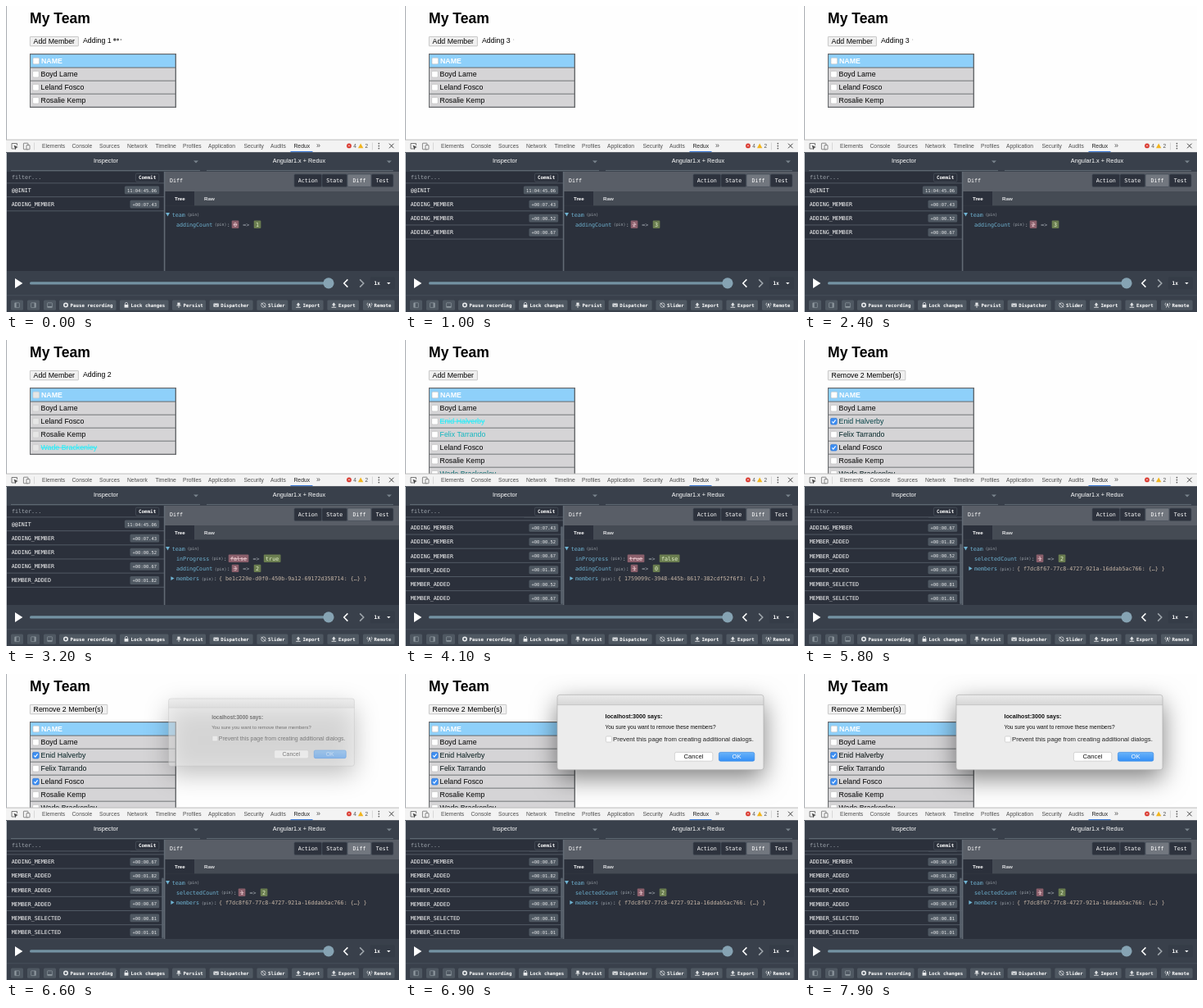
Animation, 480 px wide and 373 px high, one loop 8 s. Source, as an HTML page with a canvas:

```html
<!DOCTYPE html>
<html lang="en">
<head>
<meta charset="utf-8">
<title>My Team</title>
<style>
html, body { margin: 0; width: 100%; height: 100%; overflow: hidden; background: #fff; }
canvas { display: block; width: 480px; height: 373px; }
</style>
</head>
<body>
<canvas id="stage"></canvas>
<script>
const W = 480, H = 373, LOOP = 8000;
const SANS = '"Liberation Sans", Arial, sans-serif';
const MONO = '"DejaVu Sans Mono", Menlo, monospace';
const C = { bg: '#2b303b', bar: '#39404b', mid: '#4f5862', line: '#515964',
  text: '#fff', key: '#6fb3d2', soft: '#a3aab1' };

const canvas = document.getElementById('stage');
const ctx = canvas.getContext('2d');
const dpr = window.devicePixelRatio || 1;
canvas.width = W * dpr;
canvas.height = H * dpr;

const EVENTS = [
  { at: -400, name: '@@INIT', time: '11:04:45.06', diff: [] },
  { at: -300, name: 'ADDING_MEMBER', time: '+00:07.43', diff: [['addingCount', '0', '1']] },
  { at: 300, name: 'ADDING_MEMBER', time: '+00:00.52', diff: [['addingCount', '1', '2']] },
  { at: 900, name: 'ADDING_MEMBER', time: '+00:00.67', diff: [['addingCount', '2', '3']] },
  { at: 2700, name: 'MEMBER_ADDED', time: '+00:01.82', id: 'be1c220e-d0f0-450b-9a12-69172d358714',
    diff: [['inProgress', 'false', 'true'], ['addingCount', '3', '2']] },
  { at: 3300, name: 'MEMBER_ADDED', time: '+00:00.52', id: '4c07d1b2-62ae-4f19-b3d5-80e49a7c15f6',
    diff: [['addingCount', '2', '1']] },
  { at: 3900, name: 'MEMBER_ADDED', time: '+00:00.67', id: '1759099c-3948-445b-8617-382cdf52f6f3',
    diff: [['inProgress', 'true', 'false'], ['addingCount', '1', '0']] },
  { at: 4700, name: 'MEMBER_SELECTED', time: '+00:00.81', id: '1759099c-3948-445b-8617-382cdf52f6f3',
    diff: [['selectedCount', '0', '1']] },
  { at: 5700, name: 'MEMBER_SELECTED', time: '+00:01.01', id: 'f7dc8f67-77c8-4727-921a-16ddab5ac766',
    diff: [['selectedCount', '1', '2']] }
];

const MEMBERS = [
  { name: 'Boyd Larne' },
  { name: 'Enid Halverby', added: 3900, picked: 4700 },
  { name: 'Felix Tarrando', added: 3300 },
  { name: 'Leland Fosco', picked: 5700 },
  { name: 'Rosalie Kemp' },
  { name: 'Wade Brackenley', added: 2700 }
];

const DIALOG_AT = 6600;

function rect(x, y, w, h, color) {
  ctx.fillStyle = color;
  ctx.fillRect(x, y, w, h);
}

function box(x, y, w, h, r, fill, stroke) {
  ctx.beginPath();
  ctx.roundRect(x, y, w, h, r);
  if (fill) { ctx.fillStyle = fill; ctx.fill(); }
  if (stroke) { ctx.strokeStyle = stroke; ctx.lineWidth = 0.7; ctx.stroke(); }
}

function label(str, x, y, size, color, opt = {}) {
  ctx.font = `${opt.bold ? 'bold ' : ''}${size}px ${opt.mono ? MONO : SANS}`;
  ctx.textAlign = opt.align || 'left';
  ctx.fillStyle = color;
  ctx.fillText(str, x, y);
}

const mono = (str, x, y, color, size = 6.68, bold = false) =>
  label(str, x, y, size, color, { mono: true, bold });

function poly(points, color) {
  ctx.beginPath();
  points.forEach(([x, y]) => ctx.lineTo(x, y));
  ctx.closePath();
  ctx.fillStyle = color;
  ctx.fill();
}

function path(points, color, width) {
  ctx.beginPath();
  points.forEach(([x, y]) => ctx.lineTo(x, y));
  ctx.strokeStyle = color;
  ctx.lineWidth = width;
  ctx.stroke();
}

function dot(x, y, r, color) {
  ctx.beginPath();
  ctx.arc(x, y, r, 0, Math.PI * 2);
  ctx.fillStyle = color;
  ctx.fill();
}

const down = (x, y, r, color) => poly([[x - r, y - r / 2], [x + r, y - r / 2], [x, y + r / 2]], color);

function clip(x, y, w, h, draw) {
  ctx.save();
  ctx.beginPath();
  ctx.rect(x, y, w, h);
  ctx.clip();
  draw();
  ctx.restore();
}

function checkbox(x, y, checked, disabled) {
  const fill = checked ? '#3b8df2' : disabled ? '#e6e6e6' : '#fff';
  box(x, y, 7.6, 7.6, 1.4, fill, checked ? '#2f78d6' : disabled ? '#cfcfcf' : '#c4c4c4');
  if (checked) path([[x + 1.7, y + 4], [x + 3.2, y + 5.7], [x + 6, y + 1.9]], '#fff', 1.1);
}

function button(str, w) {
  box(29.4, 37.4, w, 11.4, 0.5, '#f0f0f0', '#b4b4b4');
  label(str, 33.6, 46, 8.8, '#000');
}

// Three dots that swell one after another.
function spinner(t) {
  for (let i = 0; i < 3; i++) {
    const p = ((t + 480 - i * 160) % 1400 + 1400) % 1400 / 1120;
    const s = p < 1 ? (1 - Math.cos(p * 2 * Math.PI)) / 2 : 0;
    if (s > 0.02) dot(132.8 + i * 3.8, 41, 1.8 * Math.sqrt(s), '#555');
  }
}

function page(t) {
  rect(0, 0, W, 163, '#fefefe');
  rect(0, 0, 1, 163, '#a9adb2');
  label('My Team', 29, 21, 17.6, '#000', { bold: true });

  const picked = MEMBERS.filter(m => m.picked <= t).length;
  if (picked) button(`Remove ${picked} Member(s)`, 94.4);
  else button('Add Member', 59);

  const started = EVENTS.filter(e => e.at <= t && e.name === 'ADDING_MEMBER').length;
  const arrived = MEMBERS.filter(m => m.added <= t).length;
  const busy = arrived > 0 && started > arrived;
  if (started > arrived) {
    label(`Adding ${started - arrived}`, 94, 44.8, 8.8, '#000');
    if (!busy) spinner(t);
  }

  const rows = MEMBERS.filter(m => !(m.added > t));
  rect(29, 58, 179, 18 + rows.length * 16, '#66686b');
  rect(30, 59.2, 176.6, 15.4, '#8ed0fa');
  checkbox(33, 63.2, false, busy);
  label('NAME', 43, 69.8, 8.8, '#fff', { bold: true });
  rows.forEach((m, i) => {
    const y = 75.6 + i * 16;
    rect(30, y, 176.6, 15.1, '#d5d4d6');
    checkbox(32.6, y + 3.8, m.picked <= t, busy);
    const age = m.added === undefined ? Infinity : t - m.added;
    const k = Math.exp(-Math.max(0, age - 500) / 1100);
    const color = `rgb(${Math.round(25 * k)},${Math.round(240 * k)},${Math.round(252 * k)})`;
    label(m.name, 42.6, y + 10.5, 8.8, color);
    if (age < 550) rect(42.6, y + 7.2, ctx.measureText(m.name).width, 0.7, color);
  });
}

function tabs() {
  rect(0, 163, W, 16, '#f3f3f3');
  rect(0, 162.6, W, 0.9, '#b5b5b5');
  path([[11, 174], [7, 174], [7, 167.5], [13.5, 167.5], [13.5, 170]], '#5a5a5a', 0.8);
  poly([[9.6, 169.8], [14.8, 172], [12.6, 172.8], [11.6, 175.4]], '#444');
  box(21.4, 167.2, 5.6, 7.6, 0.6, null, '#5a5a5a');
  box(25, 169.6, 4, 5.2, 0.4, '#f3f3f3', '#5a5a5a');
  rect(34, 166.5, 0.7, 9, '#ccc');
  const names = 'Elements Console Sources Network Timeline Profiles Application Security Audits Redux'.split(' ');
  const xs = [44, 80.5, 114, 148, 182.5, 216, 247, 290.5, 323, 351.5];
  names.forEach((n, i) => label(n, xs[i], 172.8, 6.75, i === 9 ? '#222' : '#505050'));
  rect(347.5, 177, 27, 1.2, '#3b79d8');
  label('»', 379, 173, 9, '#555');
  dot(419, 170.4, 2.9, '#d9352b');
  path([[418, 169.4], [420, 171.4]], '#fff', 0.7);
  path([[420, 169.4], [418, 171.4]], '#fff', 0.7);
  label('4', 424.2, 172.8, 6.6, '#555');
  poly([[433.2, 167.4], [436.4, 173.2], [430, 173.2]], '#f2b51d');
  label('2', 438.6, 172.8, 6.6, '#555');
  rect(447, 166.5, 0.7, 9, '#ccc');
  [167.6, 170.6, 173.6].forEach(y => dot(455.4, y, 0.85, '#555'));
  path([[468, 167.7], [473.6, 173.3]], '#444', 1);
  path([[473.6, 167.7], [468, 173.3]], '#444', 1);
}

function monitors() {
  rect(0, 178.2, W, H - 178.2, C.bar);
  const pick = (str, cx, x0, x1) => {
    label(str, cx, 191.4, 7.3, '#fff', { align: 'center' });
    down(x1 - 5, 190, 3, '#79838d');
    rect(x0, 200.2, x1 - x0, 0.9, '#66707a');
  };
  pick('Inspector', 122, 6, 237);
  pick('Angular1.x + Redux', 358, 245, 473);
}

function actions(t) {
  rect(1, 202, 192, 121, C.bg);
  mono('filter...', 7, 211, C.soft);
  box(158.4, 204.2, 28.4, 9.8, 1.5, C.bg, C.mid);
  mono('Commit', 161.9, 211.2, '#fff', 5.9, true);
  rect(1, 215.4, 192, 1, C.line);

  const seen = EVENTS.filter(e => e.at <= t);
  const pitch = 17.15, total = seen.length * pitch, view = 107.3;
  const scroll = Math.max(0, total - view);
  clip(1, 216, 192, 107, () => {
    seen.forEach((e, i) => {
      const y = 215.8 + i * pitch - scroll;
      mono(e.name, 6.7, y + 11, C.text);
      const w = e.time.length * 3.3 + 6;
      box(187.2 - w, y + 3.7, w, 9.8, 1.5, C.mid);
      mono(e.time, 190.2 - w, y + 10.7, '#e2e4e6', 5.48);
      rect(1, y + pitch - 0.8, 192, 1, C.line);
    });
    if (scroll) {
      const size = view * view / total;
      box(190.2, 215.8 + view - size, 2.6, size - 1, 1.3, '#59626d');
    }
  });
}

function value(str, x, y, fill, color, strike) {
  const w = str.length * 4.02 + 4.6;
  box(x, y - 7.2, w, 9.4, 1, fill);
  mono(str, x + 2.3, y, color);
  if (strike) rect(x + 2, y - 2.6, w - 4, 0.6, color);
  return x + w;
}

function keyName(name, x, y) {
  mono(name, x, y, C.key);
  x += name.length * 4.02 + 2.5;
  mono('(pin)', x, y - 0.4, C.soft, 4.9);
  return x + 15;
}

function diff(t) {
  rect(194, 202, 286, 121, C.bg);
  rect(194, 202, 286, 24, '#595e67');
  mono('Diff', 200, 214.6, '#fff');
  const modes = [['Action', 352, 33.6], ['State', 386, 30.6], ['Diff', 417, 29], ['Test', 446.4, 26.6]];
  modes.forEach(([name, x, w], i) => {
    box(x, 205, w, 15.4, 1.5, i === 2 ? '#72777f' : '#2d323d', '#434b56');
    label(name, x + w / 2, 214.8, 6.68, '#fff', { mono: true, align: 'center' });
  });
  rect(194, 226, 286, 17.4, '#454b54');
  rect(194, 226, 36, 17.6, C.bg);
  label('Tree', 206, 237, 6.2, '#fff', { bold: true });
  label('Raw', 242, 237, 6.2, '#e4e6e8', { bold: true });
  rect(192.8, 202, 1.6, 121, '#626a74');

  const last = EVENTS.filter(e => e.at <= t).pop();
  poly([[195, 252], [200, 252], [197.5, 256.4]], C.key);
  keyName('team', 202.8, 256.6);
  let y = 268.8;
  for (const [name, from, to] of last.diff) {
    let x = keyName(name, 208, y);
    mono(':', x, y, C.soft);
    x = value(from, x + 6, y, '#8a5f6b', '#fbdbe0', true);
    mono('=>', x + 5, y, C.soft);
    value(to, x + 18.4, y, '#6a7d50', '#e6f3cb', false);
    y += 12.1;
  }
  if (last.id) {
    poly([[201.4, y - 4.8], [205.6, y - 2.4], [201.4, y]], C.key);
    const x = keyName('members', 208, y);
    mono(':', x, y, C.soft);
    mono(`{ ${last.id}: {…} }`, 260, y, '#c9b8a8');
  }
}

function player() {
  rect(0, 323, W, 30, C.bar);
  poly([[11, 332], [20.4, 338], [11, 344]], '#fff');
  box(29, 336.2, 366, 3.4, 1.7, '#7492a3');
  dot(394, 337.8, 6.6, '#86a3b3');
  path([[417.4, 333.4], [412.8, 338], [417.4, 342.6]], '#fff', 1.5);
  path([[432.2, 333.4], [436.8, 338], [432.2, 342.6]], '#a0a7ad', 1.5);
  box(445, 330.6, 30, 14.6, 1.5, '#353c47');
  mono('1x', 449.6, 340.2, '#fff', 6.2, true);
  down(467.4, 338.2, 2.2, '#fff');
}

const ICONS = {
  rec(x, y) { dot(x, y, 3, '#e8eaec'); dot(x, y, 1.4, C.mid); },
  lock(x, y) {
    box(x - 1.6, y - 3.2, 3.2, 4, 1.6, null, '#e8eaec');
    rect(x - 2.4, y - 0.6, 4.8, 3.6, '#e8eaec');
  },
  pin(x, y) {
    rect(x - 1.6, y - 3, 3.2, 3, '#e8eaec');
    rect(x - 2.6, y, 5.2, 0.9, '#e8eaec');
    rect(x - 0.4, y, 0.8, 3.4, '#e8eaec');
  },
  keys(x, y) {
    box(x - 3.2, y - 2.2, 6.4, 4.4, 0.6, '#e8eaec');
    for (let i = -2; i < 3; i += 2) rect(x + i - 0.4, y - 1, 0.8, 0.8, C.mid);
    rect(x - 1.6, y + 0.6, 3.2, 0.7, C.mid);
  },
  clock(x, y) {
    box(x - 2.7, y - 2.7, 5.4, 5.4, 2.7, null, '#e8eaec');
    path([[x - 2.8, y - 2.8], [x + 2.8, y + 2.8]], '#e8eaec', 0.8);
  },
  up(x, y) {
    poly([[x, y - 3], [x + 2.4, y], [x - 2.4, y]], '#e8eaec');
    rect(x - 0.8, y - 0.4, 1.6, 2, '#e8eaec');
    rect(x - 2.8, y + 2.2, 5.6, 0.9, '#e8eaec');
  },
  mast(x, y) {
    dot(x, y - 1, 1, '#e8eaec');
    path([[x - 1.6, y + 3], [x, y - 1], [x + 1.6, y + 3]], '#e8eaec', 0.8);
    [-1, 1].forEach(s => path([[x + s * 2.2, y - 2.8], [x + s * 3, y - 1], [x + s * 2.2, y + 0.8]], '#e8eaec', 0.7));
  }
};

function toolbar() {
  rect(0, 352.4, W, 0.8, '#4a535e');
  [6, 26, 46].forEach((x, i) => {
    box(x, 358.4, 15, 12.4, 1.5, C.mid);
    box(x + 4.6, 361.8, 5.8, 5.8, 0.5, null, '#8f989f');
    if (i < 2) rect(x + (i ? 8.6 : 5), 362, 1.6, 5.4, '#8f989f');
    else rect(x + 4.8, 366, 5.4, 1.4, '#8f989f');
  });
  const items = [['Pause recording', 65, 69.5, 'rec'], ['Lock changes', 139, 59.5, 'lock'],
    ['Persist', 203, 41, 'pin'], ['Dispatcher', 248.6, 53, 'keys'], ['Slider', 306.4, 38, 'clock'],
    ['Import', 349, 38.6, 'up'], ['Export', 392.4, 38.6, 'up'], ['Remote', 436, 38.6, 'mast']];
  items.forEach(([name, x, w, icon]) => {
    box(x, 358.4, w, 12.4, 1.5, C.mid);
    ICONS[icon](x + 8, 364.6);
    mono(name, x + 13.6, 366.7, '#fff', 5.75, true);
  });
}

function dialog(t) {
  if (t < DIALOG_AT) return;
  const p = Math.min(1, (t - DIALOG_AT + 100) / 200);
  const s = 0.8 + 0.2 * p;
  ctx.save();
  ctx.globalAlpha = p;
  ctx.translate(312, 71);
  ctx.scale(s, s);
  ctx.translate(-312, -71);
  ctx.save();
  ctx.shadowColor = 'rgba(0,0,0,.5)';
  ctx.shadowBlur = 30 * dpr;
  ctx.shadowOffsetY = 10 * dpr;
  box(186, 25.4, 252, 91.4, 3, '#ececec');
  ctx.restore();
  const shade = ctx.createLinearGradient(0, 25, 0, 38);
  shade.addColorStop(0, '#ebebeb');
  shade.addColorStop(1, '#d6d6d6');
  box(186, 25.4, 252, 12.4, [3, 3, 0, 0], shade);
  rect(186, 37.4, 252, 0.7, '#bdbdbd');
  box(186, 25.4, 252, 91.4, 3, null, '#b4b4b4');
  label('localhost:3000 says:', 244.4, 53.6, 7.15, '#111', { bold: true });
  label('You sure you want to remove these members?', 244.4, 66.6, 6.56, '#111');
  box(245.4, 76, 7, 7, 1.2, '#fff', '#c4c4c4');
  label('Prevent this page from creating additional dialogs.', 254, 82.2, 7.75, '#222');
  box(329.4, 95.4, 46.4, 10.8, 2, '#fff', '#c6c6c6');
  label('Cancel', 352.4, 103.2, 7.7, '#111', { align: 'center' });
  const blue = ctx.createLinearGradient(0, 95, 0, 106);
  blue.addColorStop(0, '#6bb4f9');
  blue.addColorStop(1, '#3590f6');
  box(383.4, 95.4, 43.4, 10.8, 2, blue, '#3a8be6');
  label('OK', 405, 103.2, 7.7, '#fff', { align: 'center' });
  ctx.restore();
}

function draw(t) {
  ctx.setTransform(dpr, 0, 0, dpr, 0, 0);
  clip(0, 0, W, 163, () => page(t));
  tabs();
  monitors();
  actions(t);
  diff(t);
  player();
  toolbar();
  rect(0, 179, 1, 194, '#c9ccd0');
  dialog(t);
}

const start = performance.now();
function tick() {
  const t = (performance.now() - start) % LOOP;
  draw(Math.floor(t / 100) * 100);
  requestAnimationFrame(tick);
}
tick();
</script>
</body>
</html>
```
